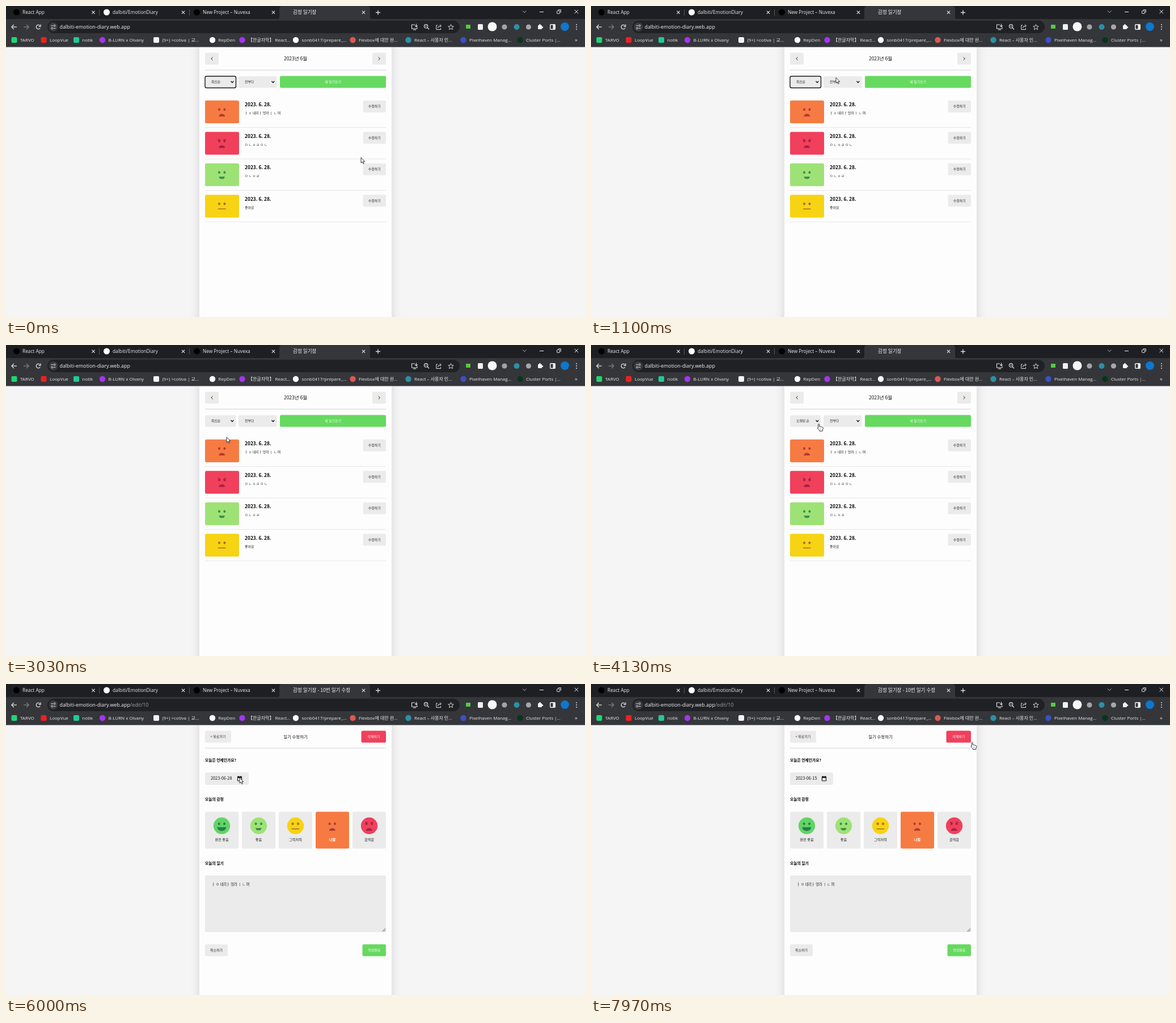
Write an HTML page with a canvas that moves like this. It is 1021 px wide and 549 px high and loops after 8000 ms.

```html
<!DOCTYPE html>
<html lang="ko">
<head>
<meta charset="utf-8">
<title>감정 일기장</title>
<style>
html, body { margin: 0; width: 100%; height: 100%; overflow: hidden; background: #f5f5f6; }
canvas { display: block; width: 1021px; height: 549px; }
</style>
</head>
<body>
<canvas id="stage"></canvas>
<script>
const W = 1021, H = 549, LOOP = 8000;
const canvas = document.getElementById('stage');
const g = canvas.getContext('2d');
const dpr = window.devicePixelRatio || 1;
canvas.width = W * dpr;
canvas.height = H * dpr;

const UI = '"Open Sans", "Noto Sans CJK KR", "Noto Sans CJK", sans-serif';
const KR = '"Noto Sans CJK KR", "Noto Sans CJK", sans-serif';
const GREY = '#ebebeb', GREEN = '#66d95f', RED = '#f0405c';
const DATE_CHANGE = 7000, EDIT_OPEN = 5500, SORT_CHANGE = 3950, BLUR = 1750;

// face colour, feature colour, label
const MOODS = [
  ['#62d467', '#258046', '완전 좋음'],
  ['#9ee276', '#3c8a4c', '좋음'],
  ['#f6d313', '#a96a2c', '그럭저럭'],
  ['#f67b43', '#b13a35', '나쁨'],
  ['#f0405c', '#a02442', '끔찍함']
];
const ENTRIES = [
  [3, 'ㅏ ㅇ 네리ㅏ 멍라 ㅣ ㄴ 며'],
  [4, 'ㅁ ㄴ ㅇ ㄹ ㅁ ㄴ'],
  [1, 'ㅁ ㄴ ㅇ ㄹ'],
  [2, '좋아요']
];

function box(x, y, w, h, r, fill, stroke, lw = 1) {
  g.beginPath();
  g.roundRect(x, y, w, h, r);
  if (fill) { g.fillStyle = fill; g.fill(); }
  if (stroke) { g.strokeStyle = stroke; g.lineWidth = lw; g.stroke(); }
}

function dot(x, y, r, fill) {
  g.beginPath();
  g.arc(x, y, r, 0, 7);
  g.fillStyle = fill;
  g.fill();
}

function line(color, lw, ...pts) {
  g.beginPath();
  for (let i = 0; i < pts.length; i += 2) g.lineTo(pts[i], pts[i + 1]);
  g.strokeStyle = color;
  g.lineWidth = lw;
  g.stroke();
}

// y is the vertical centre of the letters; returns the width
function text(str, x, y, size, color, { font = KR, weight = 400, align = 'left' } = {}) {
  g.font = `${weight} ${size}px ${font}`;
  g.textAlign = align;
  g.fillStyle = color;
  g.fillText(str, x, y + size * 0.36);
  return g.measureText(str).width;
}

const ui = (str, x, y, size, color = '#e8eaed') => text(str, x, y, size, color, { font: UI });

function cross(x, y, r, color, lw) {
  line(color, lw, x - r, y - r, x + r, y + r);
  line(color, lw, x + r, y - r, x - r, y + r);
}

function drawTabs(editing) {
  g.fillStyle = '#1e1f22';
  g.fillRect(0, 0, W, 24);
  g.fillStyle = '#35363a';
  g.beginPath();
  g.moveTo(478, 24);
  g.quadraticCurveTo(482, 24, 482, 19);
  g.lineTo(482, 5);
  g.quadraticCurveTo(482, 0, 487, 0);
  g.lineTo(637, 0);
  g.quadraticCurveTo(642, 0, 642, 5);
  g.lineTo(642, 19);
  g.quadraticCurveTo(642, 24, 646, 24);
  g.fill();
  dot(18.5, 11, 5.5, '#000');
  dot(177.5, 11, 5.5, '#fff');
  dot(336.5, 11, 5.5, '#000');
  ui('React App', 29, 11, 8.3);
  ui('dalbiti/EmotionDiary', 188, 11, 8.3);
  ui('New Project – Nuvexa', 347, 11, 8.3);
  text(editing ? '감정 일기장 - 10번 일기 수정' : '감정 일기장', 506, 11, 8.6, '#f1f3f4');
  for (const x of [154, 312.5, 471.5, 630.5]) cross(x, 11.2, 2.6, '#e8eaed', 1.1);
  for (const x of [164.5, 323.5]) line('#55575b', 1, x, 6, x, 17);
  line('#e8eaed', 1.3, 652, 11.5, 660, 11.5);
  line('#e8eaed', 1.3, 656, 7.5, 656, 15.5);
  line('#b9bbbe', 1, 911, 8.5, 914.2, 11.7, 917.4, 8.5);
  line('#f1f3f4', 1, 941, 10.5, 948, 10.5);
  box(971.5, 8.5, 5, 5, 1, null, '#f1f3f4');
  line('#f1f3f4', 1, 973.5, 6.7, 978.3, 6.7, 978.3, 11.5);
  cross(1005.8, 10, 3.2, '#f1f3f4', 1);
}

function arrow(x, y, dir, color) {
  line(color, 1.3, x - 4.5, y, x + 4.5, y);
  line(color, 1.3, x + dir * 0.7, y - 4, x + dir * 4.6, y, x + dir * 0.7, y + 4);
}

function star(x, y, r) {
  g.beginPath();
  for (let i = 0; i < 10; i++) {
    const a = i * Math.PI / 5 - Math.PI / 2, q = i % 2 ? r * 0.45 : r;
    g.lineTo(x + q * Math.cos(a), y + q * Math.sin(a));
  }
  g.closePath();
  g.strokeStyle = '#d5d7da';
  g.lineWidth = 1;
  g.stroke();
}

function drawToolbar(editing) {
  const c = '#dfe1e5';
  g.fillStyle = '#35363a';
  g.fillRect(0, 23, W, 49.5);
  arrow(14.5, 37, -1, c);
  arrow(35.5, 37, 1, '#7d7f83');
  g.beginPath();
  g.arc(57, 37, 3.7, 0.5, 5.4);
  g.strokeStyle = c;
  g.lineWidth = 1.3;
  g.stroke();
  line(c, 1.3, 61, 32.5, 61, 36, 57.6, 36);

  box(73, 26, 727, 22, 11, '#202124');
  dot(83.5, 37, 8, '#3a3b3f');
  line(c, 1, 79.5, 34.7, 83, 34.7);
  line(c, 1, 84, 39.3, 87.5, 39.3);
  for (const [x, y] of [[85.6, 34.7], [81.4, 39.3]]) {
    g.beginPath();
    g.arc(x, y, 1.5, 0, 7);
    g.stroke();
  }
  const w = ui('dalbiti-emotion-diary.web.app', 94.5, 37, 8.9, '#f1f3f4');
  if (editing) ui('/edit/10', 94.5 + w, 37, 8.9, '#9aa0a6');

  // address bar actions
  line(c, 1.1, 721, 33, 715.5, 33, 715.5, 40, 725, 40, 725, 37.5);
  line(c, 1.1, 718, 42, 723, 42);
  line(c, 1.1, 723.5, 31.5, 723.5, 36.5);
  line(c, 1.1, 721.3, 34.5, 723.5, 36.7, 725.7, 34.5);
  g.beginPath();
  g.arc(740.6, 35.8, 3.2, 0, 7);
  g.stroke();
  line(c, 1.3, 743, 38.2, 746, 41.4);
  line(c, 1, 739, 35.8, 742.2, 35.8);
  line(c, 1, 761, 34, 758.8, 34, 758.8, 41.5, 766.5, 41.5, 766.5, 39);
  line(c, 1, 761.5, 39, 762.5, 36, 767, 35);
  line(c, 1, 765, 32.5, 767.5, 35, 765, 37.5);
  star(784.5, 37.5, 5);

  // extensions
  box(811, 33, 8, 7, 1, '#55c943');
  box(832, 32, 9, 10, 1.5, '#f1f1f1');
  dot(857.5, 36.5, 8, '#f6f8f6');
  dot(879, 37, 4.6, '#a2a4a7');
  dot(900.5, 37, 5, '#2b90a8');
  dot(921.5, 37, 4.6, '#a5a7aa');
  box(938, 34, 7, 7, 1, '#f1f3f4');
  dot(941.5, 33.6, 1.6, '#f1f3f4');
  dot(945.6, 37.5, 1.6, '#f1f3f4');
  box(959.7, 32.7, 8.6, 8.6, 1, null, '#f1f3f4', 1.4);
  g.fillStyle = '#f1f3f4';
  g.fillRect(964.5, 33, 3.8, 8);
  dot(985.5, 36.5, 7.5, '#0d78cf');
  for (const y of [33, 37, 41]) dot(1006, y, 1, c);
}

// icon x, colour, round?, text
const MARKS = [
  [14.5, '#1fd673', 0, 'TARVO'],
  [66.5, '#f02020', 0, 'LoopVue'],
  [124, '#22c997', 0, 'notik'],
  [170, '#a435f0', 1, 'B-LURN x Olvany'],
  [265, '#f3f3f3', 0, '(9+) >cotiva | 교…'],
  [364, '#ffffff', 1, 'RepDen'],
  [416.5, '#a435f0', 1, '【한글자막】 React…'],
  [511, '#ffffff', 1, 'sonb0417/prepare_…'],
  [611.5, '#dc5850', 1, 'Flexbox에 대한 완…'],
  [709.5, '#2b90a8', 1, 'React – 사용자 인…'],
  [806.5, '#3a50c8', 1, 'Pixelhaven Manag…'],
  [906.5, '#08351f', 1, 'Cluster Ports |…']
];

function drawBookmarks() {
  for (const [x, color, round, label] of MARKS) {
    if (round) dot(x, 60, 5.2, color);
    else box(x - 5, 55, 10, 10, 2, color);
    ui(label, x + 10.5, 60, 8);
  }
  ui('»', 1003, 59.5, 9.5);
}

function drawPanel() {
  g.fillStyle = '#f5f5f6';
  g.fillRect(0, 72, W, H);
  g.save();
  g.beginPath();
  g.rect(0, 72.5, W, H);
  g.clip();
  g.shadowColor = 'rgba(100,100,111,0.22)';
  g.shadowBlur = 16 * dpr;
  g.shadowOffsetY = 4 * dpr;
  g.fillStyle = '#fdfdfd';
  g.fillRect(341, 60, 339, 520);
  g.restore();
  line('#e1e1e6', 1.4, 351, 113.3, 670, 113.3);
}

function button(x, y, w, h, label, fill = GREY, color = '#222') {
  box(x, y, w, h, 2.5, fill);
  text(label, x + w / 2, y + h / 2, 6, color, { align: 'center', weight: 500 });
}

function select(x, w, label, focused) {
  box(x, 124, w, 20.5, 2.5, GREY, focused && '#17181c', 1.4);
  text(label, x + 11, 134, 5.9, '#222', { weight: 500 });
  line('#111', 1.4, x + w - 9, 132.8, x + w - 6.6, 135.2, x + w - 4.2, 132.8);
}

function mouthArc(x, y, rx, ry, from, to, color, filled) {
  g.beginPath();
  g.ellipse(x, y, rx, ry, 0, from, to);
  g.closePath();
  g.fillStyle = color;
  if (filled) g.fill();
}

// features only, drawn for a face of radius 15
function face(mood, x, y, k = 1) {
  const color = MOODS[mood][1];
  g.save();
  g.translate(x, y);
  g.scale(k, k);
  for (const s of [-1, 1]) {
    g.beginPath();
    g.ellipse(s * 4.7, -3.2, 2, 2.3, 0, 0, 7);
    g.fillStyle = color;
    g.fill();
    if (mood === 4) line(color, 1.2, s * 7.2, -6.6, s * 2.6, -4.4);
  }
  if (mood === 0) mouthArc(0, 2.8, 8, 6.8, 0, Math.PI, color, true);
  if (mood === 1) mouthArc(0, 4.3, 5.2, 4, 0, Math.PI, color, true);
  if (mood === 2) line(color, 1.5, -6.8, 5.8, 6.8, 5.8);
  if (mood > 2) mouthArc(0, 9, 5.5, 4.6, Math.PI, 2 * Math.PI, color, true);
  g.restore();
}

function drawList(t) {
  button(351, 82.5, 24, 21, '');
  button(646, 82.5, 24, 21, '');
  line('#222', 1, 364.5, 90.3, 361.8, 93, 364.5, 95.7);
  line('#222', 1, 656.7, 90.3, 659.4, 93, 656.7, 95.7);
  text('2023년 6월', 510.5, 93, 8.5, '#111', { align: 'center' });
  select(351, 54.5, t < SORT_CHANGE ? '최신순' : '오래된 순', t < BLUR);
  select(410, 67.5, '전부다', false);
  button(483, 123.5, 187, 21, '새 일기쓰기', GREEN, '#fff');
  ENTRIES.forEach(([mood, note], i) => {
    const y = 166.7 + i * 55.5;
    box(351, y, 60, 40.3, 2.5, MOODS[mood][0]);
    face(mood, 380.7, y + 19.3, 1);
    text('2023. 6. 28.', 421, y + 7.3, 8.4, '#000', { weight: 700 });
    text(note, 421, y + 22.5, 6, '#222');
    button(629.5, y, 40.5, 21, '수정하기');
    line('#e6e6ea', 1, 351, y + 47.8, 670, y + 47.8);
  });
}

function heading(label, y) {
  text(label, 351, y, 6.8, '#000', { weight: 700 });
}

function calendar(x, y) {
  box(x - 3.6, y - 3.2, 7.2, 7.2, 0.8, null, '#111', 1.1);
  g.fillStyle = '#111';
  g.fillRect(x - 4, y - 3.6, 8, 2.4);
  g.fillRect(x - 2.7, y - 4.8, 1.1, 2);
  g.fillRect(x + 1.6, y - 4.8, 1.1, 2);
}

function drawEditor(t) {
  const picked = t >= DATE_CHANGE;
  button(351, 82.5, 46, 21, '< 뒤로가기');
  button(626.5, 82.5, 43.5, 21, '삭제하기', RED, '#fff');
  text('일기 수정하기', 510.5, 93, 7.4, '#111', { align: 'center' });

  heading('오늘은 언제인가요?', 134.5);
  box(351, 156, picked ? 75.8 : 77, 22, 2.5, GREY);
  text(picked ? '2023-06-15' : '2023-06-28', 361, 166.7, 7.3, '#111');
  calendar(picked ? 411 : 412, 167);

  heading('오늘의 감정', 204);
  MOODS.forEach(([color, , label], i) => {
    const x = 351 + i * 65, on = i === 3;
    box(x, 225.5, 59, 65, 2.5, on ? color : GREY);
    if (!on) dot(x + 29.5, 250.3, 14.7, color);
    face(i, x + 29.3, 250, 1);
    text(label, x + 29.5, 275.2, 6.2, on ? '#fff' : '#222', { align: 'center', weight: on ? 700 : 400 });
  });

  heading('오늘의 일기', 317);
  box(351, 338, 319, 100, 2.5, GREY);
  text(ENTRIES[0][1], 363, 353.3, 6.3, '#222');
  line('#444', 0.9, 663.5, 437, 669, 431.5);
  line('#444', 0.9, 666.5, 437, 669, 434.5);
  button(351, 459.5, 40, 21, '취소하기');
  button(628.5, 459.5, 41.5, 21, '작성완료', GREEN, '#fff');
}

// time, x, y of the pointer tip
const PATH = [
  [0, 626, 267.5], [150, 626, 267.5], [1000, 432, 126.5], [1500, 432, 126.5],
  [2100, 445, 140], [2900, 389, 162.5], [3080, 389, 162.5], [3600, 384, 134],
  [3950, 400, 139], [4500, 402, 139], [5250, 663, 179.5], [5550, 663, 179.5],
  [5950, 412, 165.5], [6250, 412, 165.5], [6800, 418, 258], [7050, 418, 258],
  [7850, 671, 102.5], [8000, 671, 102.5]
];

function pointerAt(t) {
  const i = PATH.findIndex((p, n) => n && t <= p[0]);
  const [t0, x0, y0] = PATH[i - 1], [t1, x1, y1] = PATH[i];
  const u = (t - t0) / (t1 - t0), e = u * u * (3 - 2 * u);
  return [x0 + (x1 - x0) * e, y0 + (y1 - y0) * e];
}

const ARROW = new Path2D('M0 0V9.6L2.2 7.6L3.8 11L5.3 10.3L3.8 7H6.7Z');
const HAND = new Path2D('M.2 1Q1.2-.7 2.2 1V5L5 5.3L8.2 6.3Q9.2 6.8 9 8.2L7.8 11.2V13H2.4V11.6L-.9 8.4Q-1.6 7.2-.5 6.9L.2 7.3Z');

function drawPointer(t) {
  const hand = (t > 3900 && t < 5650) || t > 7750;
  const [x, y] = pointerAt(t);
  const shape = hand ? HAND : ARROW;
  g.save();
  g.translate(x, y);
  g.fillStyle = '#fff';
  g.strokeStyle = '#222';
  g.lineWidth = 0.9;
  g.lineJoin = 'round';
  g.fill(shape);
  g.stroke(shape);
  if (hand) for (const k of [3.6, 5.4]) line('#555', 0.5, k, 8.5, k, 11);
  g.restore();
}

function draw(now) {
  const t = now % LOOP, editing = t >= EDIT_OPEN;
  g.setTransform(dpr, 0, 0, dpr, 0, 0);
  drawPanel();
  drawTabs(editing);
  drawToolbar(editing);
  drawBookmarks();
  if (editing) drawEditor(t);
  else drawList(t);
  drawPointer(t);
}

const start = performance.now();
function tick() {
  draw(performance.now() - start);
  requestAnimationFrame(tick);
}
tick();
</script>
</body>
</html>
```
